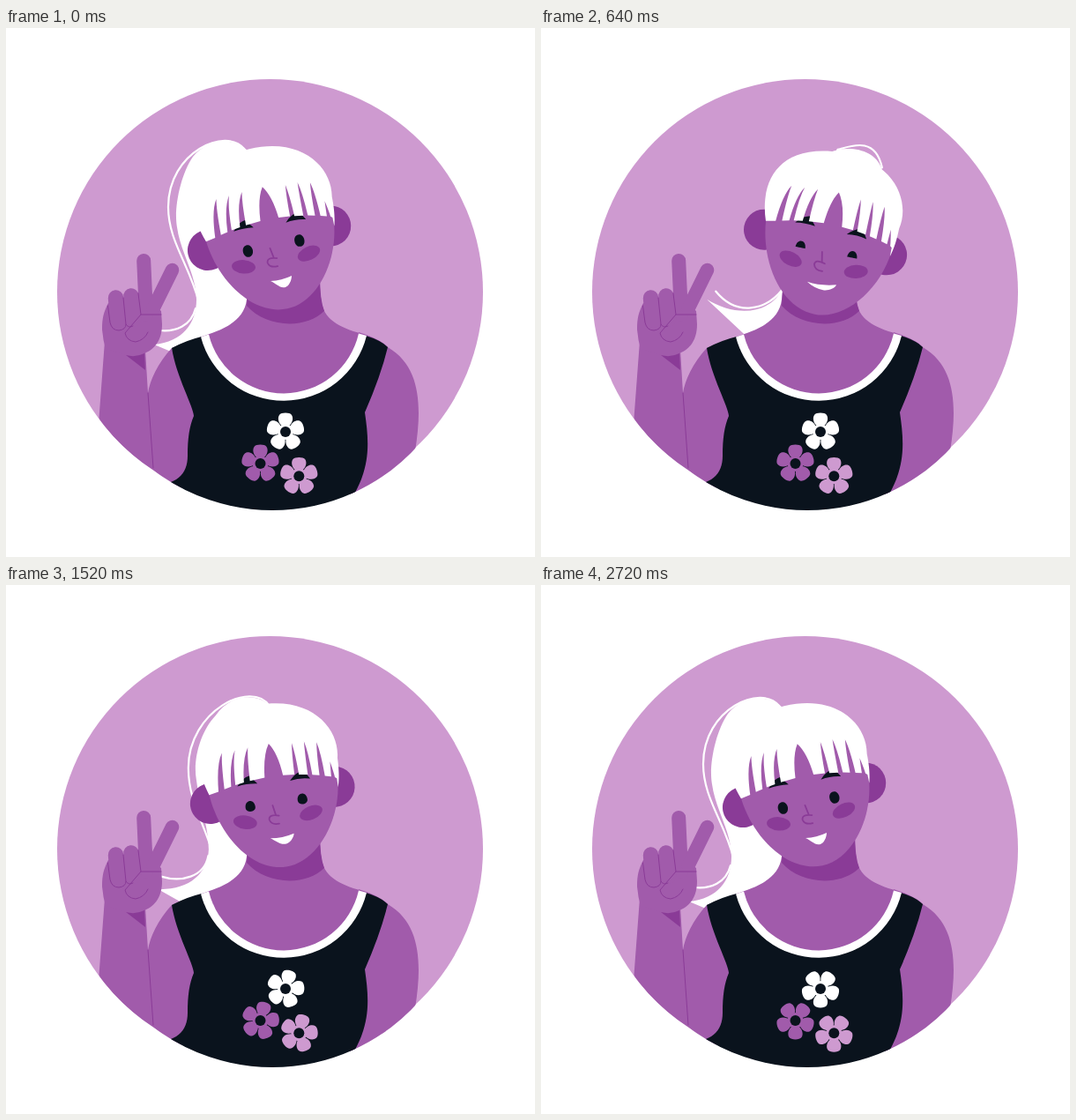
These frames come from a looping animation (600x600 px, 3.4 s). An HTML page:

```html
<!DOCTYPE html>
<html lang="en">
<head>
<meta charset="utf-8">
<title>Waving girl</title>
<style>
html, body { margin: 0; height: 100%; overflow: hidden; background: #fff; }
svg { display: block; width: 100vw; height: 100vh; }
.skin { fill: #a15bab; }
.shade { fill: #8a3b97; }
.navy { fill: #0a131d; }
.white { fill: #fff; }
.lilac { fill: #ce9ad0; }
.line { fill: none; stroke: #8a3b97; stroke-linecap: round; stroke-linejoin: round; }
.strand { fill: none; stroke: #fff; stroke-width: 2.2; stroke-linecap: round; }
.finger { fill: none; stroke: #a15bab; stroke-linecap: round; }
</style>
</head>
<body>
<svg viewBox="0 0 600 600">
  <defs>
    <!-- the bust dips slightly below the round backdrop -->
    <clipPath id="bust">
      <circle cx="299.5" cy="299.5" r="241.5"/>
      <circle cx="302" cy="324.4" r="222.6"/>
    </clipPath>
    <path id="petal" d="M-2-5C-9-10-9-16-7-19C-5-22.200 5-22.200 7-19C9-16 9-10 2-5Z"/>
    <g id="flower"><circle r="9"/></g>
  </defs>
  <circle class="lilac" cx="299.5" cy="299.5" r="241.5"/>
  <g clip-path="url(#bust)">
    <path id="tail" class="white"/>
    <path id="outerStrand" class="strand"/>
    <path id="tipStrand" class="strand"/>

    <!-- arms, neck and top -->
    <path class="skin" d="M188 363C172 380 163 400 161 414L158 365L112 355L105.500 442L130 520L190 530L220 500L214 436Z"/>
    <path class="skin" d="M400 345Q425 353 433 362C460 378 468 405 468 437Q468 455 464 480L390 550V380Z"/>
    <path class="skin" d="M274 298L273 308C270 335 240 344 222 350L188 363L315 440L433 362L408 348C382 341 362 333 358 312Q356 300 356 284Z"/>
    <path class="shade" d="M274 298L273 315C295 340 340 342 361 321Q356 308 356 282Z"/>
    <path class="navy" d="M188 363Q205 354 222 350A97 97 0 0 0 408 349Q425 354 433 362Q425 395 407 436C412 470 413 495 396 527V560H180L187 515C200 510 206 500 206 485C206 465 208 452 213 440C213 430 193 395 188 363Z"/>
    <path class="white" d="M221 350.500A97 97 0 0 0 409 349L400 346.500A87.300 87.300 0 0 1 230 347.500Z"/>
    <path class="line" d="M161 414L167 499"/>

    <!-- hand -->
    <path class="shade" d="M136 371L158 388L157 368Z"/>
    <path class="skin" d="M116 312C111 322 109 328 109 342Q110 354 113 364L136 371Q147 374 157 369C172 363 177 350 177 336L176 321L150 300Z"/>
    <path class="finger" stroke-width="16" d="M156.200 264L159 325"/>
    <path class="finger" stroke-width="15.500" d="M188.500 274.500L167 318"/>
    <path class="finger" stroke-width="17.500" d="M124.500 306L127 334M142 304L145 330"/>
    <path class="line" d="M115.500 315L118 334Q120 343 128 343Q136 342 136 336L133 306M136 336Q139 341 144 338M150 301L153 325H176M153 325L135 346Q137 355 147 356Q157 354 161 345"/>

    <g id="head">
      <circle class="shade" cx="240" cy="239" r="23"/>
      <circle class="shade" cx="382" cy="240" r="23"/>
      <path class="skin" d="M240 228C244 275 275 322 315 322C352 322 386 275 387 228L380 170H250Z"/>
      <ellipse class="shade" rx="13.500" ry="7.700" transform="translate(276 265.500) rotate(16)"/>
      <ellipse class="shade" rx="13.500" ry="7.700" transform="translate(351.500 265.500) rotate(-14)"/>
      <path class="navy" d="M273 224Q280 215 288 214L296 224Q284 222 273 224ZM333 226Q341 217 350 217L356 227Q345 224 333 226Z"/>
      <path class="line" stroke-width="1.800" d="M309.500 251L311.500 262M315 263.500Q303.500 260 303.500 266.500Q305 273 314 272.500"/>
      <path id="leftEye" class="navy" transform="translate(284.300 249)"/>
      <path id="rightEye" class="navy" transform="translate(344 249)"/>
      <path id="mouth" class="white"/>
      <path id="fringe" class="white"/>
    </g>

    <g id="flowers"></g>
  </g>
</svg>
<script>
const $ = id => document.getElementById(id);
const setPath = (id, d) => $(id).setAttribute('d', d);
const clamp = x => Math.min(1, Math.max(0, x));
const span = (t, from, to) => clamp((t - from) / (to - from));
const sine = u => (1 - Math.cos(Math.PI * u)) / 2;

// cubic-bezier(.2, .1, .7, 1)
function swing(x) {
  const curve = (s, a, b) => 3 * (1 - s) * (1 - s) * s * a + 3 * (1 - s) * s * s * b + s ** 3;
  let lo = 0, hi = 1;
  for (let i = 0; i < 24; i++) {
    const mid = (lo + hi) / 2;
    if (curve(mid, .2, .7) < x) lo = mid; else hi = mid;
  }
  return curve(lo, .1, 1);
}
const turnAt = t => swing(span(t, 0, 835)) - swing(span(t, 835, 1740));

// Hair poses: head left, upright, right
const tail = [
  'M274 139C258 124 230 124 212 146C198 166 190 205 194 226C198 255 216 280 216 308C216 335 200 356 168 359L187 367L300 360V200Z',
  'M330 138C312 119 280 122 264 150C244 165 234 190 238 215C240 240 243 262 244 292C242 320 215 336 177 331L213 354L300 360V200Z',
  'M386 160C378 136 345 132 325 142C285 155 262 185 262 215C272 240 276 270 275 292C262 326 220 328 188 308L232 349L300 360V200Z'
];
const outerStrand = [
  'M270 137C250 112 184 140 184 203C184 242 208 268 219 312',
  'M328 137C308 102 230 145 230 212C230 245 240 270 248 290',
  'M386 158C378 122 350 134 335 139C330 150 300 200 300 250'
];
const tipStrand = [
  'M174 343C192 345 210 338 215 318',
  'M178 318C205 330 240 325 244 296',
  'M198 299C222 328 255 320 273 297'
];

function blend(poses, k) {
  const i = k < 1 ? 0 : 1;
  const target = poses[i + 1].match(/\d+/g);
  let n = 0;
  return poses[i].replace(/\d+/g, v => (+v + (target[n++] - v) * (k - i)).toFixed(2));
}

// Fringe slits, right to left: tip x, tip y, left base, right base
const slits = [
  [381, 211, 380, 384], [369, 187, 367, 373], [355, 184, 354, 359], [341, 184, 339, 344],
  [315, 181, 305, 326], [291, 182, 281, 288], [276, 183, 266, 271], [261, 184, 251, 258]
];
const hemY = x => 218.5 + 11.5 * ((x - 313) / 73) ** 2;
const slitPath = ([x, y, l, r]) => {
  const lean = base => `${base + (x - base) * .2} ${y + 12}`;
  return `L${r} ${hemY(r)}Q${lean(r)} ${x} ${y}Q${lean(l)} ${l} ${hemY(l)}`;
};
setPath('fringe', 'M240 229C226 190 233 140 309 136C371 134 397 176 390 208C390 224 388 234 386 241V231'
  + slits.map(slitPath).join('') + 'Z');

$('flower').innerHTML += [0, 1, 2, 3, 4].map(i => `<use href="#petal" transform="rotate(${i * 72})"/>`).join('');
const flowers = [[317, 458, 'white'], [288.5, 494, 'skin'], [332.3, 508.3, 'lilac']];
$('flowers').innerHTML = flowers.map(([x, y, color]) =>
  `<g transform="translate(${x} ${y})"><use class="${color} spin" href="#flower"/><circle class="navy" r="6"/></g>`).join('');
const spinners = document.querySelectorAll('.spin');

function drawFace(squint) {
  const corner = 2 * squint;
  const top = corner + (-6.9 + 1.2 * squint - corner) / .75;
  const bottom = corner + (6.9 - 5 * squint - corner) / .75;
  const eye = `M-5.6 ${corner}C-5.6 ${top} 5.6 ${top} 5.6 ${corner}C5.6 ${bottom} -5.6 ${bottom} -5.6 ${corner}Z`;
  setPath('leftEye', eye);
  setPath('rightEye', eye);

  const lx = 302.6 - 3.1 * squint, ly = 287.5;
  const rx = 327.3 + 5.3 * squint, ry = 286.4 - 1.9 * squint;
  const bx = 317 + 2 * squint, by = 297.7 - 4.5 * squint;
  setPath('mouth', `M${lx} ${ly}Q315 289.5 ${rx} ${ry}C${rx - 1} ${ry + 5} ${bx + 5} ${by} ${bx} ${by}`
    + `C${bx - 6} ${by} ${lx + 6} ${ly + 4} ${lx} ${ly}Z`);
}

function draw() {
  const t = performance.now() % 3400;
  $('head').setAttribute('transform', `rotate(${-11.6 + 26 * turnAt(t)} 299 300)`);

  // The hair trails the head a little
  const trail = turnAt(t - 50);
  const pose = Math.min(2.1, trail < .37 ? trail / .37 : 1 + (trail - .37) / .445);
  setPath('tail', blend(tail, pose));
  setPath('outerStrand', blend(outerStrand, pose));
  setPath('tipStrand', blend(tipStrand, pose));

  drawFace(sine(span(t, 0, 640)) - sine(span(t, 960, 1860)));
  const spin = 180 * sine(span(t, 1250, 2730));
  spinners.forEach(f => f.setAttribute('transform', `rotate(${spin})`));
  requestAnimationFrame(draw);
}
draw();
</script>
</body>
</html>
```
